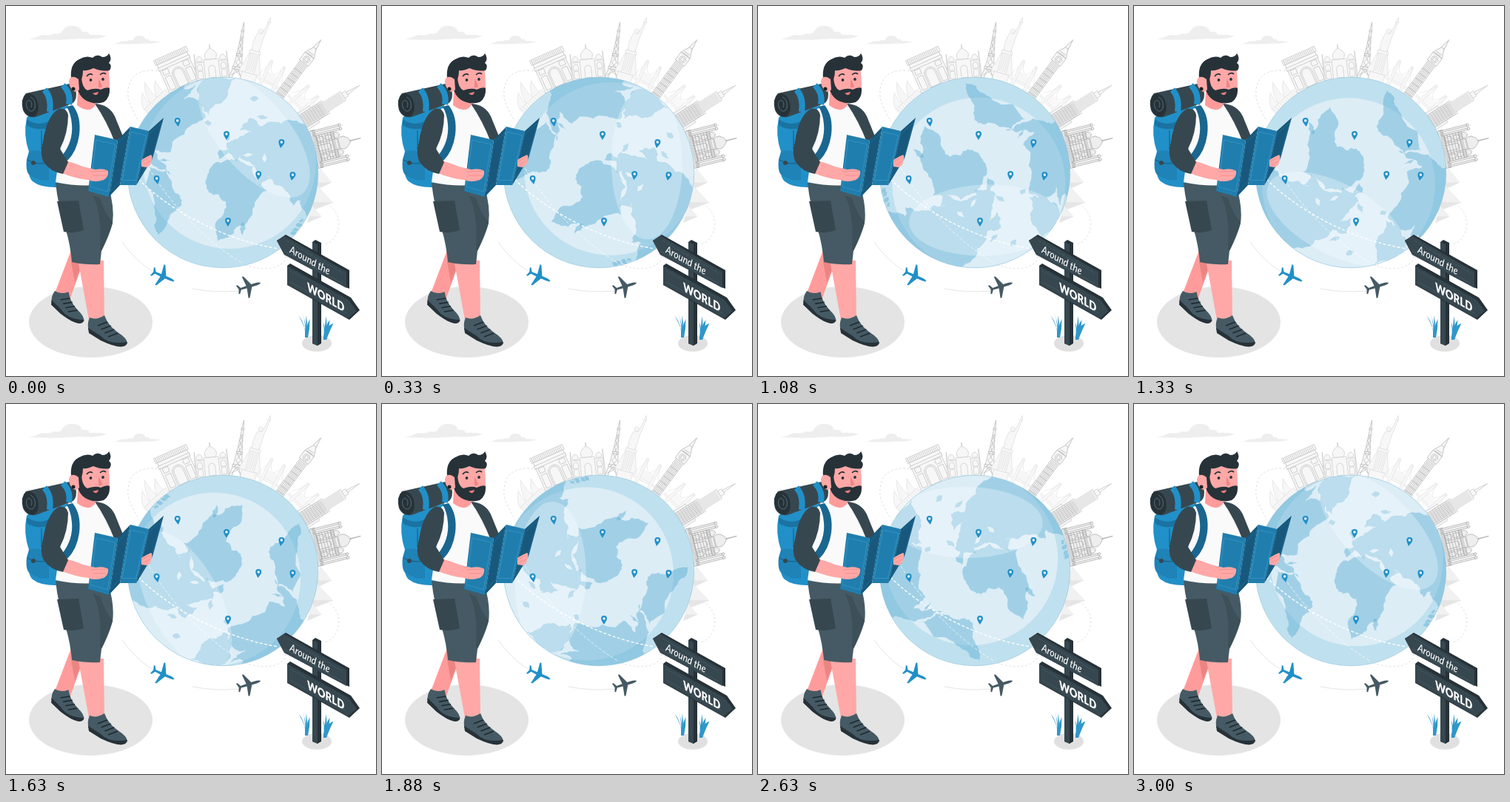
Recreate the animation shown at these times as an HTML page. Size 500 by 500 pixels, loop 3040 ms.

```html
<!DOCTYPE html>
<html lang="en">
<head>
<meta charset="utf-8">
<title>Around the world</title>
<style>
html,body{margin:0;width:100%;height:100%;overflow:hidden;background:#fff}
svg{display:block;width:100vw;height:100vh}
</style>
</head>
<body>
<svg viewBox="0 0 500 500">
<defs>
  <clipPath id="disc"><circle cx="293" cy="225" r="128.8"/></clipPath>
  <g id="pin"><path d="M0 6Q-4 0-4-2a4 4 0 0 1 8 0Q4 0 0 6z" fill="#2190c8"/><circle cy="-2" r="1.700" fill="#fff"/></g>
  <path id="plane" d="M17 0Q15-1.800 11-1.800H4L-3-15H-5L-3-1.800-11-1.400-14-6H-16L-14 0-16 6H-14L-11 1.400-3 1.800-5 15H-3L4 1.800H11Q15 1.800 17 0z"/>
  <g id="shoe">
    <path d="M113 421Q122 425 133 418Q138 432 151 441Q164 449 164 456Q154 463 128 449L112 439Q109 430 113 421z" fill="#455a64"/>
    <path d="M111 435L128 446Q139 458 164 454Q162 468 128 452L112 442z" fill="#263238"/>
    <g id="laces" stroke="#202b31" stroke-width="1.800"></g>
  </g>
</defs>

<g id="clouds" fill="#eee">
  <path id="cloud" d="M31 45Q40 43 49 39Q59 41 65 37Q73 39 76 34Q82 25 91 27Q100 27 103 35Q111 33 113 39Q125 38 136 41Q120 46 100 44Q70 47 31 45z"/>
  <use href="#cloud" transform="translate(127 24) scale(.6)"/>
</g>

<path d="M210 88C178 83 163 96 165 123Q167 136 180 156M428 264Q450 274 450 296Q447 317 431 322M318 348Q344 358 364 353Q381 346 377 336" fill="none" stroke="#dedede" stroke-width=".9" stroke-dasharray="3 2.500"/>
<path d="M157 319Q174 343 197 358M252 382Q282 388 314 385" fill="none" stroke="#e6e6e6"/>

<g id="landmarks" stroke-width=".6" stroke-linejoin="round"></g>

<g id="globe" clip-path="url(#disc)">
  <circle cx="293" cy="225" r="129" fill="#bfe0ee"/>
  <circle cx="302" cy="211" r="117" fill="#dcedf6"/>
  <g id="land" fill="#5aaad2" fill-opacity=".45" fill-rule="evenodd"></g>
  <ellipse cx="335" cy="174" rx="103" ry="48" transform="rotate(50 335 174)" fill="#fff" opacity=".28"/>
</g>
<circle cx="293" cy="225" r="128.800" fill="none" stroke="#8fc3dc" stroke-width=".6"/>
<g fill="none" stroke="#fff" stroke-dasharray="4 2.500">
  <path d="M179 234C222 277 294 316 368 328" stroke-width="1.300"/>
  <path d="M187 208C210 252 260 312 320 348" stroke-width=".7"/>
</g>
<g id="pins"></g>

<use href="#plane" transform="translate(212 365) rotate(24)" fill="#2190c8"/>
<use href="#plane" transform="translate(328 379) rotate(-17)" fill="#455a64"/>

<g id="signpost">
  <ellipse cx="420" cy="456" rx="20" ry="11" fill="#e0e0e0"/>
  <g id="grass" fill="#2f97cb"></g>
  <path d="M414 319L418 316 426 320V456L421 459 414 456z" fill="#263238"/>
  <path d="M414 319L421 322V459L414 456z" fill="#37474f"/>
  <path d="M366 317L378 309 464 357V382L459 380 376 336z" fill="#263238"/>
  <path d="M366 317L377 311 460 359V381L376 336z" fill="#37474f"/>
  <path d="M380 351L384 348 466 394 478 411 464 424 380 377z" fill="#263238"/>
  <path d="M380 351L463 397 474 412 462 422 380 376z" fill="#37474f"/>
  <path d="M379 317L455 361M376 331L455 375M384 358L406 370M384 373L460 415" fill="none" stroke="#455a64" stroke-width=".8"/>
  <g fill="#fff">
    <text transform="matrix(.82 .47 -.14 1 383 333)" font-family="Lato,sans-serif" font-size="14" font-style="italic" font-weight="500">Around the</text>
    <text transform="matrix(.8 .46 0 1 407 385)" font-family="Lato,sans-serif" font-size="16.500" font-weight="900">WORLD</text>
  </g>
</g>

<g id="traveller">
  <ellipse cx="114.500" cy="427" rx="83.500" ry="48" fill="#e4e4e4"/>

  <g id="backpack">
    <path d="M28 151Q33 144 45 146L84 134 82 236 72 245Q47 246 36 237Q27 229 31 197Q23 174 28 151z" fill="#2190c8"/>
    <path d="M28 153Q44 164 62 154L60 164Q41 170 28 161z" fill="#1a73a2"/>
    <path d="M31 197Q44 192 58 201V235Q47 238 33 229Q26 226 28 207z" fill="#1f83b7"/>
    <path d="M29 208Q42 215 56 212M48 168V194" fill="none" stroke="#166087" stroke-width="1.200"/>
    <circle cx="37" cy="212" r="3" fill="#37474f"/>
    <path d="M27 118L86 105Q95 108 95 119Q95 129 89 132L40 150Q28 152 23 141Q19 126 27 118z" fill="#37474f"/>
    <path d="M52 113Q62 124 59 143M77 107Q88 118 85 133" fill="none" stroke="#2190c8" stroke-width="8"/>
    <ellipse cx="33" cy="134" rx="10.500" ry="16" transform="rotate(-12 33 134)" fill="#263238"/>
    <path d="M33 123Q41 127 39 138Q35 146 29 139Q25 130 31 127Q37 130 34 137" fill="none" stroke="#546e7a"/>
  </g>

  <g id="legs">
    <path d="M88 330L105 345 86 397 66 388z" fill="#ff9c9b"/>
    <path d="M88 345H104L93 374z" fill="#eb8584"/>
    <path d="M97 342L132 344 133 420 112 424z" fill="#ffa8a7"/>
    <use href="#shoe" transform="translate(66 385) rotate(12) scale(.92) translate(-113 -421)"/>
    <use href="#shoe"/>
  </g>

  <g id="shorts">
    <path d="M67 239L138 243Q147 271 144 294Q137 315 129 331L127 349Q107 350 89 346Q87 323 81 303Q70 269 67 239z" fill="#455a64"/>
    <path d="M117 256Q130 277 127 327L129 331Q143 304 144 291Q136 286 127 260z" fill="#37474f" opacity=".55"/>
    <path d="M69 264L98 263 105 303Q92 308 78 305z" fill="#37474f"/>
  </g>

  <g id="torso">
    <path d="M80 139L98 132 122 133Q138 143 140 172L139 240Q103 246 67 238L73 195z" fill="#fafafa"/>
    <path d="M120 132Q139 133 147 149L158 176 147 184Q136 155 120 132z" fill="#37474f"/>
    <path d="M97 115L121 123 120 135Q112 146 96 134z" fill="#ff9c9b"/>
    <path d="M82 136L90 134Q102 149 99 174Q96 196 83 209L76 202Q91 183 89 160Q88 146 82 136z" fill="#1a668f"/>
  </g>

  <g id="head">
    <path d="M97 82L138 80Q140 95 140 112Q138 130 120 128Q101 126 97 108z" fill="#ffa8a7"/>
    <path d="M88 98Q86 78 99 72Q108 66 117 70Q123 64 130 69Q137 69 139 64Q144 71 139 77Q144 80 140 87Q130 89 118 84Q109 88 104 87Q104 99 98 105z" fill="#263238"/>
    <path d="M98 98L102 97Q103 111 110 114Q121 110 128 113Q136 109 140 111Q141 124 132 130Q119 134 107 127Q98 121 96 109z" fill="#263238"/>
    <path d="M98 99Q91 93 86 98Q83 105 89 113Q94 119 99 113z" fill="#ffa8a7"/>
    <circle cx="91" cy="112" r="2.500" fill="#202020"/>
    <path d="M125 98Q130 107 130 109Q128 111 125 110" fill="#ee8584"/>
    <circle cx="114.500" cy="100" r="1.900" fill="#263238"/><circle cx="131" cy="99" r="1.900" fill="#263238"/>
    <path d="M109 95Q113 90 117 93M127 93Q131 89 135 92" fill="none" stroke="#263238" stroke-width="1.700"/>
    <path d="M117 118Q121 117 125 116Q124 121 120 120z" fill="#f27e7e"/>
  </g>

  <g id="map"></g>

  <g id="arms">
    <path d="M72 207Q90 211 104 217L121 221Q132 219 138 223Q139 231 132 235Q121 239 111 235Q93 233 76 226z" fill="#ffa8a7"/>
    <path d="M71 139Q82 137 84 147Q84 172 73 193L84 211 77 227Q60 224 51 211Q45 201 50 183Q55 149 71 139z" fill="#37474f"/>
    <path d="M183 208Q189 204 196 201Q199 204 196 210Q196 216 190 218L183 217z" fill="#ffa8a7"/>
    <path d="M114 224L136 223M117 229H135M184 210L194 205M186 214L195 210" stroke="#ef8a89" stroke-width=".8"/>
  </g>
</g>
</svg>

<script>
const CX = 293, CY = 225, RADIUS = 129, FPS = 24, FRAMES = 73, LOOP = 3040;
const $ = id => document.getElementById(id);
const range = (n, f) => Array.from({length: n}, (_, i) => f(i)).join('');
const path = (d, extra = '') => `<path d="${d}" ${extra}/>`;
const lerp = (a, b, t) => a.map((v, i) => v + (b[i] - v) * t);

// Coasts: a few key points, roughened by seeded midpoint displacement.
let seed = 7;
const random = () => (seed = seed * 16807 % 2147483647) / 2147483647;
function roughen(a, b, depth) {
  if (!depth) return [a];
  const shift = (random() - .5) * .36, mid = lerp(a, b, .5);
  const m = [mid[0] - (b[1] - a[1]) * shift, mid[1] + (b[0] - a[0]) * shift];
  return [...roughen(a, m, depth - 1), ...roughen(m, b, depth - 1)];
}
function coast(points, depth = 3) {
  const line = points.flatMap((p, i) => roughen(p, points[(i + 1) % points.length], depth));
  return 'M' + line.map(p => p.map(v => v.toFixed(1))).join('L') + 'z';
}
const parse = text => text.split(' ').map(p => p.split(',').map(Number));
const island = (x, y, w, h) => coast([[x - w, y], [x, y - h], [x + w, y], [x, y + h]], 2);

const northAmerica = '170,180 188,128 225,106 248,101 240,112 256,106 240,127 253,124 270,150 252,160 226,182 223,197 200,196 206,208 222,228 204,218 180,190';
const southAmerica = '194,216 216,222 224,240 238,263 232,276 220,288 206,309 200,296 199,257 189,240';
const greenland = '258,112 284,95 310,97 300,117 282,133 274,147 267,142';
const africa = '272,230 284,211 308,208 334,217 343,240 353,250 333,279 327,291 300,313 286,318 285,290 297,264 274,252';
const eurasia = '288,207 289,194 300,193 298,185 316,176 332,170 316,169 330,151 344,163 372,159 412,164 432,200 430,268 410,288 398,262 388,270 376,247 352,229 360,234 343,244 331,213 316,204 312,211 301,198';

$('land').innerHTML = [northAmerica, southAmerica, greenland, africa].map(c => path(coast(parse(c)))).join('')
  + path(coast(parse(eurasia)) + island(327, 201, 7, 2.500) + island(349, 205, 3, 6))
  + path(island(335, 125, 6, 4) + island(299, 176, 4, 8) + island(320, 301, 4, 9) + island(273, 158, 5, 4) + island(347, 150, 8, 3) + island(214, 208, 8, 2)
    + range(6, i => island(388 + i * 4, 302 - i * 4 + random() * 8, 5, 3)));

$('pins').innerHTML = parse('232,157 298,175 372,186 204,235 341,229 387,230 300,292')
  .map(([x, y]) => `<use href="#pin" transform="translate(${x} ${y}) rotate(${(x - CX) / 8})"/>`).join('');

$('laces').innerHTML = range(4, i => path(`M${124 + i * 4.700} ${432 + i * 5}l13-5`));
$('grass').innerHTML = [406, 431].map((x, side) => range(4, i => {
  const lean = (i - 1.500) * 5 + (side ? 4 : -3), top = 413 + side * 6 + Math.abs(i - 1) * 5;
  return path(`M${x - 2} ${448 + side * 3}Q${x} 432 ${x + lean} ${top}Q${x + lean * .4 + 3} 436 ${x + 2} ${448 + side * 3}z`);
})).join('');

const mapTop = parse('120,174 151,181 168,163 193,169 213,151');
const mapBottom = parse('111,250 139,258 154,242 176,242 198,206');
$('map').innerHTML = range(4, i => {
  const quad = [mapTop[i], mapTop[i + 1], mapBottom[i + 1], mapBottom[i]];
  const middle = lerp(lerp(quad[0], quad[2], .5), lerp(quad[1], quad[3], .5), .5);
  const outline = q => 'M' + q.join('L') + 'z';
  const [face, edge] = i % 2 ? ['#17587c', '#226e96'] : ['#207eae', '#3c9ac7'];
  return path(outline(quad), `fill="${face}"`)
    + path(outline(quad.map(p => lerp(p, middle, .17))), `fill="none" stroke="${edge}" stroke-width=".7"`);
});

// Landmarks are drawn upright on the ground line y = 0, then turned around the globe.
const place = (angle, tone, art, fill = '#f7f7f7') =>
  `<g transform="translate(${CX} ${CY}) rotate(${angle}) translate(0 ${-RADIUS})" stroke="${tone}" fill="${fill}">${art}</g>`;
const block = (w, top, bottom = -2, x = 0) => path(`M${x - w / 2} ${-top}h${w}V${-bottom}h${-w}z`);
const spire = (w, from, to, x = 0) => path(`M${x - w / 2} ${-from}L${x} ${-to} ${x + w / 2} ${-from}z`);
const arch = (w, h, x = 0, base = 0) => path(`M${x - w / 2} ${-base}v${-h}a${w / 2} ${w / 2} 0 0 1 ${w} 0v${h}z`);
const dome = (r, base, x = 0) => path(`M${x - r * .8} ${-base}q${-r * .7}${-r} ${r * .8}${-r * 1.900}q${r * 1.500} ${r * .9} ${r * .8} ${r * 1.900}z`);
const rungs = (w, from, to, gap) => path(range((to - from) / gap, i => `M${-w / 2} ${-from - i * gap}h${w}`), 'fill="none"');
const bars = (w, from, to, gap) => path(range(w / gap, i => `M${-w / 2 + (i + .5) * gap} ${-from}V${-to}`), 'fill="none"');
const pair = (x, part) => part(-x) + part(x);

const bridge = block(36, 8, 5) + pair(9.500, x => block(4, 36, -2, x))
  + path('M-18-12Q-12-20-9-36Q0-4 10-36Q13-20 18-12', 'fill="none"') + bars(16, 8, 20, 2);
const shell = (x, h) => path(`M${x - 8}-6Q${x - 5} ${-h * .7} ${x + 6} ${-h}Q${x + 2}-14 ${x + 4}-6z`);
const pyramid = (x, w, h) => spire(w, -2, h, x) + path(`M${x} ${-h}l${w * .15} ${h + 2}h${w * .35}z`, 'fill="#e5e5e5"');

$('landmarks').innerHTML = [
  place(-43, '#dedede', block(40, 6) + shell(-12, 24) + shell(0, 32) + shell(12, 24) + bars(40, 0, 5, 4)),
  place(-24, '#b9b9b9', block(44, 40) + block(48, 47, 40) + block(46, 35, 31) + arch(17, 18) + arch(13, 18)
    + pair(15, x => block(8, 20, 1, x) + block(8, 30, 23, x)) + bars(46, 41, 46, 2.500)),
  place(-6, '#c3c3c3', block(44, 22) + block(20, 25) + dome(8, 25) + spire(1, 40, 45) + arch(9, 12)
    + pair(16, x => dome(4, 23, x) + arch(7, 7, x) + arch(7, 5, x, 11)) + pair(22, x => spire(2, 0, 34, x))),
  place(8, '#adadad', path('M-10 2Q-3-20-1-68L0-76 1-68Q3-20 10 2H6Q4-11 0-11Q-4-11-6 2z') + block(14, 15, 12) + block(8, 33, 30) + block(4, 65, 63)
    + range(6, i => {
      const w = 7 / (1 + i * .5), y = -3 - i * 9;
      return path(`M${-w} ${y}L${w * .7} ${y - 9}M${w} ${y}L${-w * .7} ${y - 9}`);
    })),
  place(15, '#dadada', block(20, 10) + spire(30, 10, 60) + block(12, 38, 10) + block(15, 41, 37)
    + path('M-5-41Q-7-56-3-65L3-66 7-84 9-83 6-60 5-41z') + '<circle cy="-69" r="3"/>' + spire(4, 83, 90, 8) + bars(10, 12, 36, 2.500)),
  place(27, '#e4e4e4', bridge),
  place(36.500, '#a8a8a8', block(12, 62) + block(15, 68, 55) + spire(15, 68, 85) + spire(5, 80, 94)
    + '<circle cy="-61" r="4.500"/><circle cy="-61" r="2.500"/>' + bars(10, 0, 54, 2) + rungs(12, 2, 54, 8) + rungs(9, 69, 76, 2.500)),
  place(48, '#e4e4e4', bridge),
  place(57.500, '#bdbdbd', block(26, 18) + block(20, 36) + block(14, 64) + block(8, 70, 64) + spire(4, 70, 90)
    + bars(12, 0, 62, 2) + bars(20, 0, 34, 2) + rungs(20, 0, 34, 4)),
  place(76, '#a0a0a0', block(52, 5) + block(36, 29, 5) + block(14, 32, 5) + dome(8.500, 33) + spire(1, 48, 63) + arch(8, 13, 0, 5)
    + pair(12, x => dome(4, 29, x) + arch(6, 6, x, 6) + arch(6, 5, x, 17))
    + pair(19, x => block(2.500, 38, 2, x) + dome(2, 38, x)) + pair(24, x => block(2.500, 38, 2, x) + dome(2, 38, x))
    + bars(52, 0, 5, 2) + bars(36, 24, 29, 2) + rungs(36, 5, 30, 4), '#eee'),
  place(103, '#ececec', pyramid(-20, 30, 17) + pyramid(6, 36, 25) + pyramid(28, 24, 14), '#f1f1f1')
].join('');

const globe = $('globe');
function draw(ms) {
  const step = Math.min(FRAMES - 1, Math.floor((ms % LOOP + 4) * FPS / 1000));
  globe.setAttribute('transform', `rotate(${step * 360 / FRAMES} ${CX} ${CY})`);
}

const start = performance.now();
function tick() {
  draw(performance.now() - start);
  requestAnimationFrame(tick);
}
tick();
</script>
</body>
</html>
```
